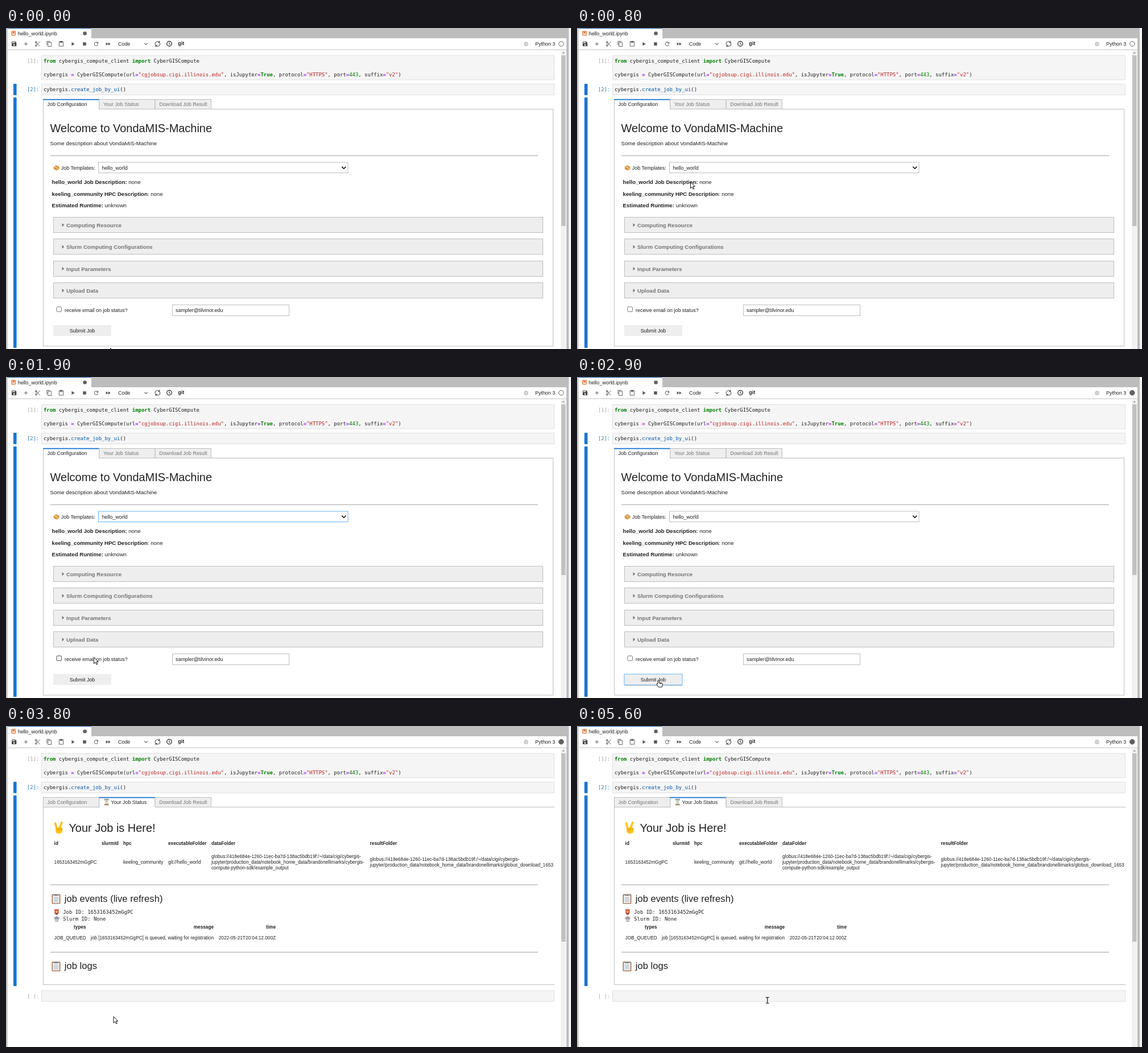
Animation, 993 px wide and 564 px high, one loop 8000 ms. Source, as an HTML page:

```html
<!DOCTYPE html>
<html lang="en">
<head>
<meta charset="utf-8">
<title>Notebook job submission</title>
<style>
  html, body { margin: 0; width: 100%; height: 100%; overflow: hidden; background: #fff; }
  svg { display: block; }
  text { font: 8.93px "Liberation Sans", Arial, sans-serif; fill: #212121; white-space: pre; }
  .mono { font-family: "DejaVu Sans Mono", monospace; }
  .p { font-size: 9.62px; }
  .h1 { font-size: 19.94px; }
  .h2 { font-size: 16.62px; }
  .td { font-size: 8.24px; }
  .b { font-weight: bold; }
  .end { text-anchor: end; }
  .mid { text-anchor: middle; }
  .dim { fill: #757575; }
  .idle { fill: #a8a8a8; }
  .live { fill: #307fc1; }
  .white { fill: #fff; }
  .kw { fill: #008000; font-weight: bold; }
  .op { fill: #aa22ff; font-weight: bold; }
  .str { fill: #ba2121; }
  .num { fill: #008000; }
  .prop { fill: #0055aa; }
  .box { fill: #fff; stroke: #bdbdbd; }
  .cell { fill: #f5f5f5; stroke: #e0e0e0; }
  .line { fill: none; stroke: #555; stroke-width: 1.1; }
  .fold rect { fill: #eee; stroke: #bdbdbd; }
  .fold text, .fold path { fill: #757575; }
  .fold.over rect { fill: #fff; }
  .fold.over text, .fold.over path { fill: #111; }
</style>
</head>
<body>
<svg id="stage" width="993" height="564" viewBox="0 0 993 564"></svg>
<script>
const LOOP = 8000;
const text = (x, y, s, c = '') => `<text x="${x}" y="${y}" class="${c}">${s}</text>`;
const rect = (x, y, w, h, attrs) => `<rect x="${x}" y="${y}" width="${w}" height="${h}" ${attrs}/>`;
const span = (c, s) => `<tspan class="${c}">${s}</tspan>`;
const rule = y => rect(78, y - .5, 857, 1, 'fill="#a0a0a0"');
const at = (x, y, body, id = '') => `<g ${id && `id="${id}"`} transform="translate(${x} ${y})">${body}</g>`;
const path = (d, attrs) => `<path d="${d}" ${attrs}/>`;

// Small pictograms, drawn from their top left corner
const clipboard =
  rect(1.5, 2, 15, 17, 'rx="1.5" fill="#a9785a"') + rect(3.2, 4, 11.6, 13.6, 'fill="#f1f3f4"') +
  path('M5 8h8M5 10.3h8M5 12.6h8M5 14.9h8', 'stroke="#90a4ae" stroke-width=".8"') +
  path('M5.5 5V3H7.3a1.8 1.8 0 0 1 3.4 0H12.5V5z', 'fill="#78909c"');
const hourglass =
  path('M1.5 1.5h6.5q0 2.8-2.4 4.2 2.4 1.3 2.4 4.2H1.5q0-2.9 2.4-4.2Q1.5 4.3 1.5 1.5z', 'fill="#cfe3ee" stroke="#9fb4c0" stroke-width=".5"') +
  path('M2.7 3.3h4.1L4.75 5.5zM2.4 9.8q.5-2 2.35-2.4 1.9.4 2.4 2.4z', 'fill="#f0a93a"') +
  rect(.7, .3, 8.1, 1.4, 'fill="#8d6e4b"') + rect(.7, 9.8, 8.1, 1.4, 'fill="#8d6e4b"');
const parcel =
  path('M0 3 5 .5 10.3 3 5.4 5.4z', 'fill="#f2c57c"') + path('M0 3 5.4 5.4V10L.4 7.5z', 'fill="#d9963f"') +
  path('M10.3 3 5.4 5.4V10l4.6-2.4z', 'fill="#e8ae58"') + path('M2.3 1.9 7.6 4.4v1.7l1-.5V3.8L3.4 1.3z', 'fill="#b9783a"');
const postbox =
  path('M1.5 1H8.5V8H1.5z', 'fill="#d9363e"') + rect(2.8, 7.6, 4.4, 2.2, 'fill="#90343a"') +
  rect(.8, .4, 8.4, 1.5, 'rx=".7" fill="#e8565c"') + path('M3.2 3h3.6v3.2L5 7.2 3.2 6.2z', 'fill="#fbc94a"');
const robot =
  rect(1.6, 1.8, 7, 6, 'rx="1" fill="#90a4ae"') + path('M5.1 0v2M0 4h1.6M8.6 4h1.6M2 9.4h6.2', 'stroke="#78909c" stroke-width="1.2"') +
  '<circle cx="3.6" cy="4" r=".9" fill="#e5524a"/><circle cx="6.6" cy="4" r=".9" fill="#e5524a"/>' + rect(3, 6, 4.2, .9, 'fill="#eceff1"');
const victory =
  path('M6.2 13 3.6 4.2M11.4 12 14.8 2.6', 'stroke="#fcc21b" stroke-width="3.6" stroke-linecap="round"') +
  path('M4 12.5q6-3 11.4-.8 2 3.6.2 7.8-1 2.5-5.8 2.5-4.4 0-5.6-3.4z', 'fill="#fcc21b"') +
  path('M10.5 12.2q2.4.3 2.1 3.4M14 12.2q2 .8 1.4 3.6M5 14.5q4-1.6 6.3.4-.6 2-3.6 2', 'fill="none" stroke="#dc9400" stroke-width=".9"');

// Toolbar icons on a 24 unit grid, centred on x
const icon = (x, body) => `<g transform="translate(${x - 5.5} 22.5) scale(.458)" fill="#555" stroke="none">${body}</g>`;
const wire = d => path(d, 'fill="none" stroke="#555" stroke-width="2"');
const toolbar =
  icon(14.2, path('M17 3H5a2 2 0 0 0-2 2V19a2 2 0 0 0 2 2H19a2 2 0 0 0 2-2V7zM12 19a3 3 0 1 1 0-6 3 3 0 0 1 0 6zM15 9H5V5H15z', 'fill-rule="evenodd" fill="#444"')) +
  icon(35, wire('M12 5V19M5 12H19')) +
  icon(55.7, wire('M8.5 8.5 21 21M8.5 15.5 21 3') + '<g fill="none" stroke="#555" stroke-width="2.2"><circle cx="6" cy="6" r="3"/><circle cx="6" cy="18" r="3"/></g>') +
  icon(76, wire('M7 6H20V22H7zM3 17V2H16')) +
  icon(97, wire('M4 3H20V21H4z') + path('M7 2h3a2 2 0 0 1 4 0h3V7H7z', '')) +
  icon(117.3, path('M8 5V19L19 12z', '')) +
  icon(138, path('M6 6H18V18H6z', '')) +
  icon(158.5, path('M17.65 6.35A8 8 0 1 0 19.73 14H17.65A6 6 0 1 1 16.2 7.8L13 11h7V4z', '')) +
  icon(179.3, path('M4 18 12.5 12 4 6zM13 6V18L21.5 12z', '')) +
  text(197, 31, 'Code') +
  path('M243.3 26.6 246 29.3 248.7 26.6', 'class="line"') +
  path('M262.6 29.6a4.2 4.2 0 0 1 6.9-4.6M270.2 26.2a4.2 4.2 0 0 1-6.8 4.7M269.8 22.6 269.9 25.6 266.9 25.4M263 33.4 263 30.4 266 30.6', 'class="line"') +
  '<circle cx="287" cy="27.6" r="4.3" fill="none" stroke="#222" stroke-width="1.2"/>' +
  path('M287 25V28L289 29.2', 'fill="none" stroke="#222"') +
  text(302.3, 30.4, 'git', 'b') +
  '<g stroke="#b5b5b5" fill="none"><rect x="911.8" y="25.2" width="4.4" height="6.2" rx="2"/>' +
  '<path d="M910.3 26.2h7.4M910.3 28.4h7.4M910.3 30.6h7.4M912.4 24 913.4 25.2M915.6 24 914.6 25.2"/></g>' +
  text(930, 31, 'Python 3') +
  '<circle id="kernel" cx="975.8" cy="27.8" r="4.3" stroke="#616161"/>';

const chrome =
  rect(0, 0, 993, 564, 'fill="#fff"') + rect(0, 0, 2.6, 564, 'fill="#bdbdbd"') +
  rect(150, 0, 839, 18, 'fill="#bdbdbd"') + rect(2.6, 0, 147.4, 1.2, 'fill="#2f6cab"') +
  rect(985, 0, 4, 564, 'fill="#bdbdbd"') + rect(989, 0, 4, 564, 'fill="#f3f3f3"') +
  rect(3, 37.5, 982, 1, 'fill="#bdbdbd"') + rect(3, 38.5, 982, 1, 'fill="#eee"') +
  rect(10, 5.8, 6.4, 6.8, 'rx=".6" fill="#fff" stroke="#e46e2e" stroke-width="1.3"') +
  path('M11.6 6.5h3.2V10.4L13.2 9.2 11.6 10.4z', 'fill="#e46e2e"') +
  text(20.7, 12.5, 'hello_world.ipynb') + '<circle cx="138.6" cy="9.5" r="3.3" fill="#616161"/>' +
  toolbar +
  rect(975, 39, 9.5, 525, 'fill="#f1f1f1"') + path('M977.3 44.8 979.7 41.8 982.1 44.8z', 'fill="#a0a0a0"') +
  rect(976, 48, 7.5, 300, 'id="thumb" fill="#c1c1c1"');

const eq = span('op', '=');
const cells =
  rect(62.5, 48.5, 901, 42.5, 'class="cell"') + text(37, 61.3, '[1]:', 'mono idle') +
  text(66, 61.3, `${span('kw', 'from')} cybergis_compute_client ${span('kw', 'import')} CyberGISCompute`, 'mono') +
  text(66, 84.6, `cybergis ${eq} CyberGISCompute(url${eq}${span('str', '"cgjobsup.cigi.illinois.edu"')}, isJupyter${eq}` +
    `${span('kw', 'True')}, protocol${eq}${span('str', '"HTTPS"')}, port${eq}${span('num', '443')}, suffix${eq}${span('str', '"v2"')})`, 'mono') +
  rect(62.5, 98.5, 901, 19, 'class="cell"') + text(37, 111.3, '[2]:', 'mono live') +
  text(66, 111.3, `cybergis.${span('prop', 'create_job_by_ui')}()`, 'mono') +
  rect(13, 98, 5.6, 20, 'rx="1" fill="#1976d2"') + rect(13, 122, 5.6, 440, 'id="bar" rx="1" fill="#1976d2"');

function tabs(active) {
  const names = ['Job Configuration', 'Your Job Status', 'Download Job Result'];
  return names.map((name, i) => {
    const x = 65.5 + i * 98.3, on = i === active, wait = on && i === 1;
    return rect(x, 125.5, 98.3, 17, `fill="${on ? '#fff' : '#eee'}" stroke="#bdbdbd"`) +
      (on ? rect(x - .5, 124.8, 99, 1.8, 'fill="#1976d2"') + rect(x + .5, 141.5, 97.3, 2, 'fill="#fff"') : '') +
      (wait ? at(172, 128, hourglass) : '') +
      text(wait ? 184.5 : x + 7.1, 137, name, on ? '' : 'dim');
  }).join('');
}

const folds = ['Computing Resource', 'Slurm Computing Configurations', 'Input Parameters', 'Upload Data'];
const fold = (name, i) => {
  const y = 332.5 + i * 38.4;
  return `<g class="fold">${rect(83.5, Math.floor(y) + .5, 860, 27, '')}` +
    `${path(`M98.6 ${y + 10.4}v6.4l3.6-3.2z`, '')}${text(106, y + 17.2, name, 'p b')}</g>`;
};
const option = (name, i) => text(168.5, 264 + i * 11.5, name, i === 2 ? 'white' : '');
const menu =
  rect(164, 256, 439.5, 49.5, 'rx="1" fill="#000" opacity=".16"') + rect(162.5, 254.5, 438.5, 47.5, 'fill="#fff" stroke="#7a8794"') +
  rect(163, 278, 437.5, 11.8, 'fill="#1e90ff"') + ['wrfhydro-5.x', 'summa3', 'hello_world', 'data_fusion'].map(option).join('');

const form =
  rect(65.5, 142.5, 896, 416.5, 'class="box"') + tabs(0) +
  text(77.6, 182.8, 'Welcome to VondaMIS-Machine', 'h1') +
  text(77.6, 205.5, 'Some description about VondaMIS-Machine', 'p') + rule(224.3) +
  at(83.6, 240.5, parcel) + text(96.8, 248.8, 'Job Templates:') +
  rect(162.5, 236, 438.5, 18.5, 'id="select" fill="#fff"') + text(168.5, 248.8, 'hello_world') +
  path('M590.3 243.6 593.8 247.2 597.3 243.6', 'fill="none" stroke="#111" stroke-width="1.6"') +
  text(80.6, 274, span('b', 'hello_world Job Description:') + ' none', 'p') +
  text(80.6, 294.6, span('b', 'keeling_community HPC Description') + ': none', 'p') +
  text(80.6, 314.6, span('b', 'Estimated Runtime:') + ' unknown', 'p') +
  folds.map(fold).join('') +
  rect(89, 490, 8.4, 8.4, 'id="check" rx="1.4" fill="#fff"') + text(103, 498.8, 'receive email on job status?') +
  rect(292.5, 486.5, 205, 19, 'class="box"') + text(298, 498.8, 'sampler@tilvinor.edu') +
  rect(83.5, 524, 101.5, 19, 'id="shade" fill="#000" opacity=".16"') +
  rect(83, 522, 102, 19, 'id="button" fill="#eee"') + text(134, 534.8, 'Submit Job', 'mid') +
  `<g id="menu">${menu}</g>`;

const user = 'brandonellimarks', jobId = '1653163452mGgPC';
const root = 'globus://418e684e-1260-11ec-ba7d-138ac5bdb19f:/~/data/cigi/cybergis-';
const home = `jupyter/production_data/notebook_home_data/${user}/`;
const columns = [[84.6, 'id'], [168, 'slurmId'], [206, 'hpc'], [285, 'executableFolder'], [361, 'dataFolder'], [639.6, 'resultFolder']];
const job =
  at(83, 167, victory) + text(110.4, 185.6, 'Your Job is Here!', 'h1') +
  columns.map(([x, s]) => text(x, 209, s, 'td b')).join('') +
  text(84.6, 242, jobId, 'td') + text(206, 242, 'keeling_community', 'td') + text(285, 242, 'git://hello_world', 'td') +
  [root, home + 'cybergis-', 'compute-python-sdk/example_output'].map((s, i) => text(361, 232.3 + i * 9.6, s, 'td')).join('') +
  [root, home + 'globus_download_1653'].map((s, i) => text(639.6, 237 + i * 9.6, s, 'td')).join('');
const log =
  at(84, 321.5, postbox) + text(100.2, 330, `Job ID: ${jobId}`, 'mono') +
  at(84, 333.5, robot) + text(100.2, 341.8, 'Slurm ID: None', 'mono') +
  [[140.6, 'types', 'JOB_QUEUED'], [365, 'message', `job [${jobId}] is queued, waiting for registration`], [474, 'time', '2022-05-21T20:04:12.000Z']]
    .map(([x, head, s]) => text(x, 356, head, 'td b end') + text(x, 374.6, s, 'td end')).join('');
const section = (y, title) => rule(y) + at(79, y + 14.5, clipboard) + text(102.8, y + 30, title, 'h2');
const status =
  rect(65.5, 142.5, 896, 139, 'id="panel" class="box"') + tabs(1) +
  `<g id="job">${job}</g><g id="log">${log}</g>` +
  `<g id="events">${section(170, 'job events (live refresh)')}</g>` +
  `<g id="logs">${section(224.4, 'job logs')}` +
  rect(62.5, 292, 901, 19, 'class="cell"') + text(37, 304.6, '[ ]:', 'mono idle') + '</g>';

const pointers =
  path('M.5.5V11.6L3.1 9.2 5 13.2 6.8 12.4 5 8.5H8.3z', 'id="arrow" fill="#fff" stroke="#111" stroke-linejoin="round"') +
  path('M-.9 7.4V1.4a1.1 1.1 0 0 1 2.2 0V5l4.7.8q1.6.4 1.4 2.2L6.6 10.8 6.2 12.8H.4L-2.9 8.4Q-3.4 6.8-1.8 6.9zM2.6 5.4V7.4M4.6 5.8V7.6', 'id="hand" fill="#fff" stroke="#111" stroke-linejoin="round"') +
  `<g id="beam">${['#fff" stroke-width="2.6', '#111" stroke-width="1.2'].map(c =>
    path('M-3 .8H-1Q0 .8 0 1.6 0 .8 1 .8H3M0 1.4V10.4M-3 11H-1Q0 11 0 10.2 0 11 1 11H3', `fill="none" stroke="${c}"`)).join('')}</g>`;

const stage = document.getElementById('stage');
stage.innerHTML = `<clipPath id="page">${rect(0, 39, 964, 525, '')}</clipPath>` + chrome + cells +
  `<g id="form">${form}</g><g id="status" clip-path="url(#page)">${status}</g><g id="cursor">${pointers}</g>`;

// [ms, x, y, pointer]
const moves = [
  [0, 183, 562, 'arrow'], [400, 186, 504, 'arrow'], [500, 191, 420, 'hand'], [600, 196, 336, 'hand'],
  [700, 198, 298, 'arrow'], [800, 199, 270, 'arrow'], [900, 199, 249, 'arrow'], [1000, 198, 240, 'arrow'],
  [1800, 192, 290, 'arrow'], [1900, 154, 492, 'arrow'], [2000, 142, 534, 'arrow'],
  [2200, 142, 538, 'hand'], [2300, 143, 548, 'arrow'], [2400, 143, 532, 'hand'], [3200, 143, 533, 'arrow'],
  [3600, 152, 526, 'arrow'], [3700, 168, 518, 'arrow'], [3800, 188.5, 510, 'arrow'], [3900, 222, 502, 'arrow'],
  [4000, 264, 499, 'arrow'], [4100, 304, 505, 'arrow'], [4200, 329, 512, 'arrow'],
  [4600, 331, 514, 'arrow'], [4700, 334, 516, 'arrow'], [4800, 336, 514, 'arrow'], [4900, 338, 512, 'arrow'],
  [5300, 337.5, 509, 'arrow'], [5400, 337, 499, 'arrow'], [5500, 336, 488, 'arrow'], [5600, 334.7, 476, 'beam']
];

const el = {};
stage.querySelectorAll('[id]').forEach(n => el[n.id] = n);
const foldEls = [...stage.querySelectorAll('.fold')];
const show = (id, on) => el[id].style.display = on ? '' : 'none';
const set = (id, attrs) => { for (const k in attrs) el[id].setAttribute(k, attrs[k]); };
const drop = (id, y) => set(id, { transform: `translate(0 ${y})` });

function draw(t) {
  const within = (a, b) => t >= a && t < b;
  const [, x, y, kind] = moves.filter(m => m[0] <= t).pop();
  const sent = t >= 3200, clicked = t >= 2900;
  const hasJob = t >= 3300, hasLog = t >= 3400;
  const grow = hasLog ? 173 : hasJob ? 109 : 0;

  set('cursor', { transform: `translate(${x} ${y})` });
  for (const k of ['arrow', 'hand', 'beam']) show(k, k === kind);

  show('form', !sent);
  show('status', sent);
  show('menu', within(1200, 1600));
  show('job', hasJob);
  show('log', hasLog);
  foldEls.forEach((f, i) => f.classList.toggle('over', i === 0 && within(600, 700) || i === 2 && within(500, 600)));
  set('select', { stroke: within(1200, 2900) ? '#64b5f6' : '#bdbdbd' });
  set('check', { stroke: within(1900, 2000) ? '#444' : '#767676' });
  show('shade', kind === 'hand' && t >= 2200);
  set('button', { stroke: clicked ? '#64b5f6' : 'none' });
  set('kernel', { fill: clicked ? '#616161' : '#fff' });

  drop('events', hasJob ? 109 : 0);
  drop('logs', grow);
  set('panel', { height: 139 + grow, width: hasJob ? 1000 : 896 });
  set('bar', { height: sent ? 162 + grow : 440 });
  set('thumb', { height: !sent ? 300 : hasLog ? 331 : hasJob ? 358 : 399 });
}

const start = performance.now();
function tick() {
  draw((performance.now() - start) % LOOP);
  requestAnimationFrame(tick);
}
tick();
</script>
</body>
</html>
```
